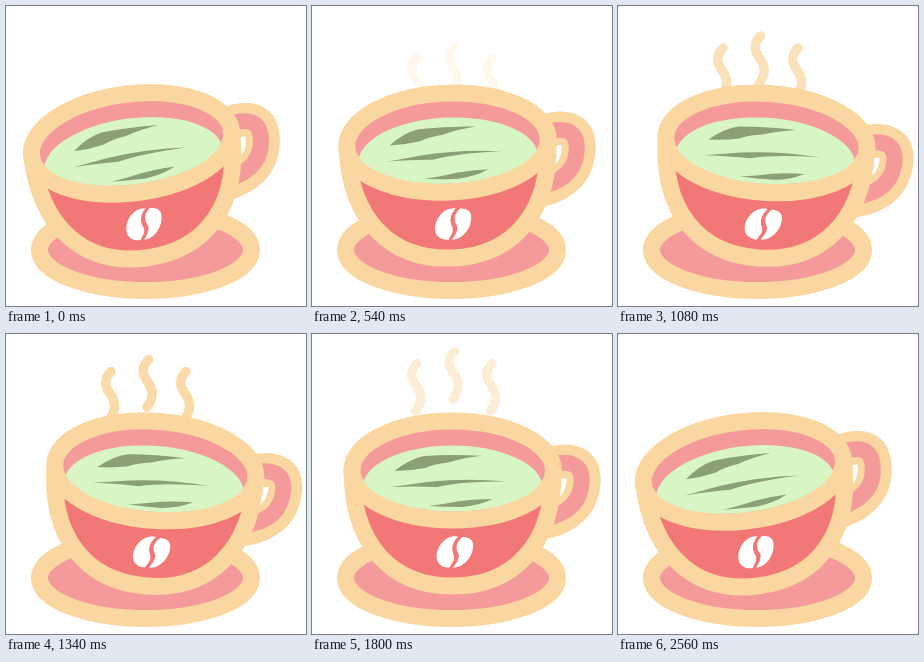
Recreate the animation shown at these times as an HTML page. Size 300 by 300 pixels, loop 2600 ms.

```html
<!DOCTYPE html>
<html lang="en">
<head>
<meta charset="utf-8">
<title>Rocking cup</title>
<style>
  html, body { margin: 0; width: 100%; height: 100%; overflow: hidden; background: #fff; }
  svg { display: block; width: 100vw; height: 100vh; }
  .cream { stroke: #fad7a0; }
  .leaf { fill: #8ca077; }
</style>
</head>
<body>
<svg viewBox="0 0 300 300" fill="none">
  <defs>
    <path id="wisp" d="M142.5 4.5C134.5 13 136.5 19 140.5 25C147.5 35 148.5 42 141 52"/>
    <clipPath id="rim"><ellipse cx="140.5" cy="136.5" rx="92.4" ry="41"/></clipPath>
  </defs>

  <g id="steam" class="cream" stroke-width="9.5" stroke-linecap="round">
    <use href="#wisp"/>
    <use href="#wisp" x="-37.5" y="12"/>
    <use href="#wisp" x="37.5" y="12"/>
  </g>

  <ellipse class="cream" fill="#f59a9a" cx="139.5" cy="244" rx="106" ry="40.5" stroke-width="17"/>

  <g id="cup">
    <path class="cream" stroke-width="34" d="M236 130Q271.5 120 271.5 146Q270 180 232 188"/>
    <path stroke="#f59a9a" stroke-width="16" d="M236 131Q269.5 122 269.5 146Q269 177 232 184.5"/>

    <path class="cream" fill="#f27877" stroke-width="17"
      d="M40 137C40 210 79 252 140.5 252S241 210 241 137"/>
    <ellipse class="cream" fill="#f59a9a" cx="140.5" cy="136.5" rx="100.8" ry="49.5" stroke-width="17"/>
    <ellipse clip-path="url(#rim)" cx="140.5" cy="153.5" rx="90" ry="42" fill="#d8f6c3"/>

    <path class="leaf" d="M82.5 137Q97 125 112 122Q140 120 169.5 121.7Q150 124 136 128.5Q122 130 113 134Q98 137 82.5 137Z"/>
    <path class="leaf" d="M79 153L115 148Q155 143.5 195 147.5Q150 147.5 125 153Q105 152 79 153Z"/>
    <path class="leaf" d="M116 172Q133 170 148 167Q164 165 180.5 165Q166 172 150 173Q134 173 116 172Z"/>

    <g fill="#fff">
      <path d="M146 202.5C134 200.5 124.5 212 124.5 223C124.5 230 131 234 137.5 233.5C139 230 143 227 142 222C140 217 138 211 146 202.5Z"/>
      <path d="M150.5 203C158 203 162 207 161 213C160 225 150 234 141 233.5C144 230 148 224 146.5 220C143 214 144 208 150.5 203Z"/>
    </g>
  </g>
</svg>
<script>
  const LOOP = 2600, STEP = 20;
  const cup = document.getElementById('cup');
  const steam = document.getElementById('steam');

  function fade(t) {
    const a = t < 1300 ? (t - 420) / 880 : (2150 - t) / 850;
    return 0.95 * Math.pow(Math.max(0, a), 0.9);
  }

  function draw(t) {
    const sway = (1 - Math.cos(2 * Math.PI * (t + 40) / LOOP)) / 2;
    const rise = Math.max(11.5, 44.4 - 0.0175 * t);
    cup.setAttribute('transform', `rotate(${-7.3 + 11.7 * sway} 140 255)`);
    steam.setAttribute('transform', `translate(0 ${rise})`);
    steam.setAttribute('opacity', fade(t));
  }

  const start = performance.now();
  function tick() {
    const t = (performance.now() - start) % LOOP;
    draw(Math.floor(t / STEP) * STEP);
    requestAnimationFrame(tick);
  }
  draw(0);
  requestAnimationFrame(tick);
</script>
</body>
</html>
```
